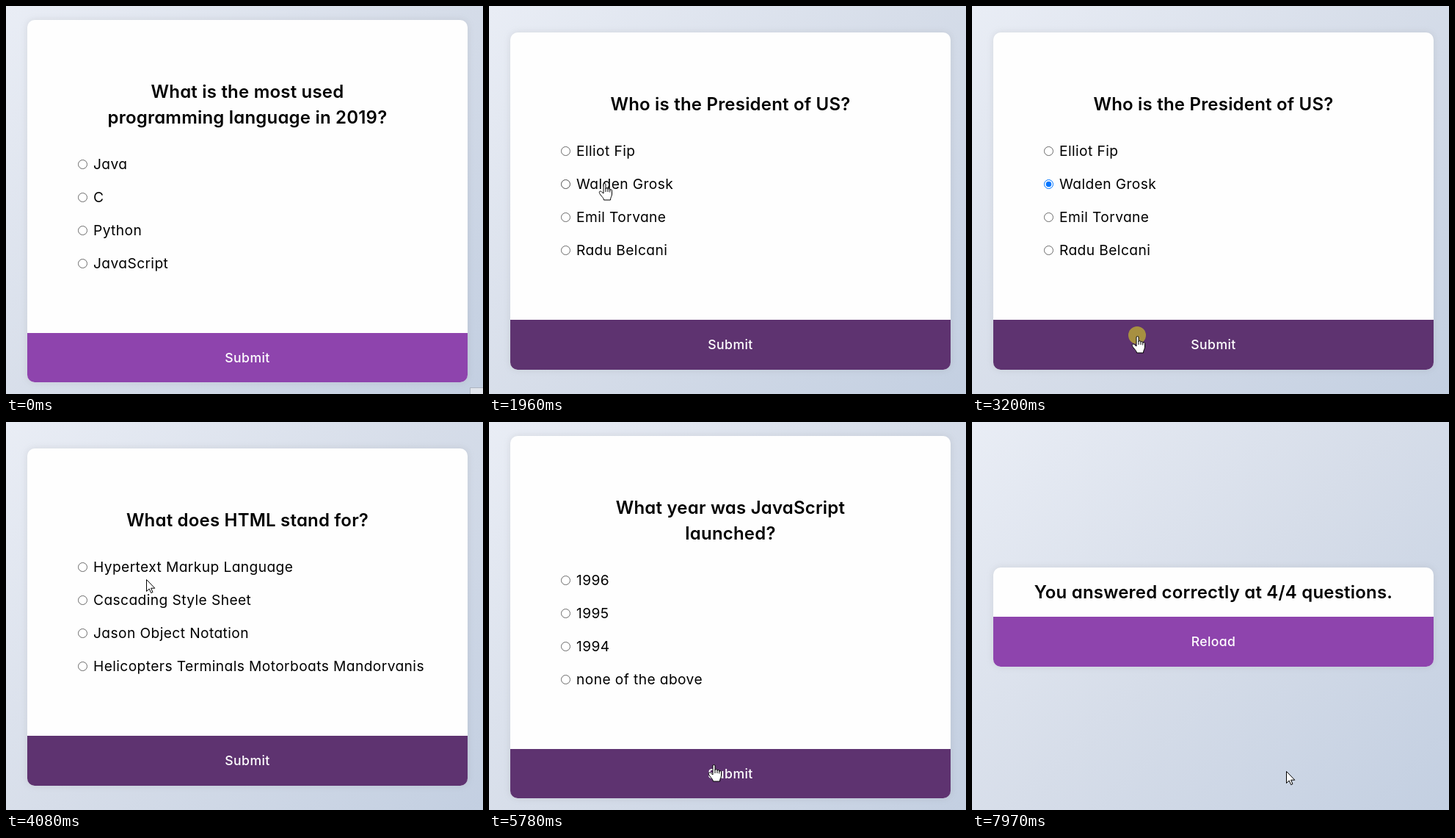
An HTML page for the animation above (8 s loop, 650 by 528 pixels).

```html
<!DOCTYPE html>
<html lang="en">
<head>
<meta charset="utf-8">
<title>Quiz</title>
<style>
  html, body { margin: 0; width: 100%; height: 100%; overflow: hidden; }
  body { background: linear-gradient(135deg, #e9edf5, #d6dde9 50%, #c3cfe1); }
  svg { display: block; width: 650px; height: 528px; }
  text {
    font: 400 19.2px Inter, "Open Sans", sans-serif;
    font-optical-sizing: none;
    font-feature-settings: "cv11";
    letter-spacing: .4px;
  }
  .title, .action { text-anchor: middle; }
  .title { font-size: 24px; font-weight: 600; letter-spacing: .2px; }
  .action { font-size: 17.6px; font-weight: 500; fill: #fff; }
  .card { fill: #fefefe; filter: drop-shadow(0 0 5px rgba(100, 100, 100, .15)); }
  .button { fill: #8e44ad; }
  .dark .button { fill: #5e3370; }
  .ring { fill: #fff; stroke: #6a6a6a; }
  .hover .ring { stroke: #4f4f4f; }
  .dot { fill: #0075ff; visibility: hidden; }
  .checked .ring { stroke: #0075ff; }
  .checked .dot { visibility: inherit; }
  .pulse { fill: rgba(217, 206, 33, .6); }
  .pointer { fill: #fff; stroke: #000; stroke-linejoin: round; }
</style>
</head>
<body>
<svg id="stage" viewBox="0 0 650 528"></svg>
<script>
const LOOP = 8000;
const ENTER = 70;       // pointer comes into view
const PULSE = 130;      // click highlight
const RESPONSE = 65;    // delay from click to effect
const REST = 250;       // pause after a click before moving on
const LEFT = 29, WIDTH = 600, MIDDLE = 265.5;
const LINE = 35, ROW = 45, BUTTON = 67.5;

// Each question: the pointer picks an option, then sends the answer
const scenes = [
  { title: ['What is the most used', 'programming language in 2019?'],
    options: ['Java', 'C', 'Python', 'JavaScript'], answer: 3,
    pick: { x: 185, y: 357, arrive: 420, click: 490 },
    send: { x: 216, y: 449, arrive: 900, click: 1170 } },
  { title: ['Who is the President of US?'],
    options: ['Elliot Fip', 'Walden Grosk', 'Emil Torvane', 'Radu Belcani'], answer: 1,
    pick: { x: 157, y: 241, arrive: 1960, click: 2160 },
    send: { x: 225, y: 449, arrive: 2720, click: 3200 } },
  { title: ['What does HTML stand for?'],
    options: ['Hypertext Markup Language', 'Cascading Style Sheet', 'Jason Object Notation',
      'Helicopters Terminals Motorboats Mandorvanis'], answer: 0,
    pick: { x: 190, y: 204, arrive: 4220, click: 4420 },
    send: { x: 306, y: 466, arrive: 5050, click: 5650 } },
  { title: ['What year was JavaScript', 'launched?'],
    options: ['1996', '1995', '1994', 'none of the above'], answer: 1,
    pick: { x: 140, y: 266, arrive: 6410, click: 6680 },
    send: { x: 424, y: 471, arrive: 7530, click: 7600 } },
  { title: ['You answered correctly at 4/4 questions.'], options: [], action: 'Reload' }
];

const clicks = scenes.flatMap(({ pick, send }) => pick ? [pick, send] : []);
const stops = [
  { x: 655, y: 430, arrive: 0, click: ENTER - REST },
  ...clicks,
  { x: 428, y: 475, arrive: 7940, click: LOOP }
];

const stage = document.getElementById('stage');

function add(parent, tag, attrs = {}, text = '') {
  const node = document.createElementNS('http://www.w3.org/2000/svg', tag);
  for (const key in attrs) node.setAttribute(key, attrs[key]);
  node.textContent = text;
  return parent.appendChild(node);
}

function show(node, visible) {
  node.style.visibility = visible ? 'visible' : 'hidden';
}

function buildScene(scene, index) {
  const { title, options, action = 'Submit' } = scene;
  const padding = options.length ? 64 : 0;
  const body = 32 + LINE * title.length + 2 * padding + (options.length ? 196 : 0);
  const top = Math.round(MIDDLE - (body + BUTTON) / 2);
  const bottom = Math.round(MIDDLE + (body + BUTTON) / 2);
  const button = Math.round(MIDDLE + (body - BUTTON) / 2);

  const node = add(stage, 'g');
  add(node, 'rect', { class: 'card', x: LEFT, y: top, width: WIDTH, height: bottom - top, rx: 10 });
  add(node, 'path', { class: 'button',
    d: `M${LEFT} ${button}h${WIDTH}V${bottom - 10}a10 10 0 0 1 -10 10H${LEFT + 10}a10 10 0 0 1 -10 -10Z` });
  add(node, 'text', { class: 'action', x: LEFT + WIDTH / 2, y: button + 40 }, action);
  title.forEach((line, i) => add(node, 'text',
    { class: 'title', x: LEFT + WIDTH / 2, y: top + padding + 42 + LINE * i }, line));

  const rows = options.map((label, i) => {
    const y = top + 126.5 + LINE * title.length + ROW * i;
    const row = add(node, 'g');
    add(row, 'circle', { class: 'ring', cx: 104.5, cy: y, r: 6 });
    add(row, 'circle', { class: 'dot', cx: 104.5, cy: y, r: 3.8 });
    const text = add(row, 'text', { x: 119, y: y + 6.5 }, label);
    return { node: row, y, right: 119 + text.getComputedTextLength() };
  });

  const start = index ? scenes[index - 1].send.click + RESPONSE : 0;
  Object.assign(scene, { node, rows, start, button, bottom });
}

scenes.forEach(buildScene);
const corner = add(stage, 'rect',
  { x: 632.5, y: 519.5, width: 20, height: 12, fill: '#e1e5ec', stroke: '#aeb5c1' });
const pulse = add(stage, 'circle', { class: 'pulse', cy: -1, r: 12 });
const arrow = add(stage, 'path',
  { class: 'pointer', d: 'M.5 .5V16.5L4.2 13 6.7 18.6 9 17.6 6.6 12.2H11.8Z' });
const hand = add(stage, 'path', { class: 'pointer',
  d: 'M-1 12V2a1.5 1.5 0 0 1 3 0V8a1.5 1.5 0 0 1 3 .2v.6a1.4 1.4 0 0 1 2.8 .3v.8' +
     'a1.3 1.3 0 0 1 2.7 .3V15c0 3-2 4-2 8H-.5c0-3-5-6.5-6-9.5s2-3 3-1.5L-1 14Z' +
     'M2 8v4M5 9v3M7.8 10v2.5' });

function pointerAt(t) {
  const next = stops.findIndex((stop, i) => i && t < stop.click + REST);
  const from = stops[next - 1], to = stops[next];
  const leave = from.click + REST;
  const progress = Math.min(1, (t - leave) / (to.arrive - leave));
  const k = Math.sin(Math.max(0, progress) * Math.PI / 2);
  return [from.x + (to.x - from.x) * k, from.y + (to.y - from.y) * k];
}

function render() {
  const t = performance.now() % LOOP;
  const scene = scenes.filter(s => s.start <= t).pop();
  const [x, y] = pointerAt(t);
  const inView = t >= ENTER;
  const picked = scene.pick && t >= scene.pick.click + RESPONSE;
  const overButton = x > LEFT && x < LEFT + WIDTH && y > scene.button && y < scene.bottom;
  // The button stays dark after sending until the next option is picked
  const pressed = scene.start > 0 && scene.pick && !picked;
  let overRow = false;

  scenes.forEach(s => show(s.node, s === scene));
  scene.node.classList.toggle('dark', Boolean(overButton || pressed));
  scene.rows.forEach((row, i) => {
    const over = inView && x > 98 && x < row.right && Math.abs(y - row.y) < 16;
    overRow ||= over;
    row.node.classList.toggle('hover', over);
    row.node.classList.toggle('checked', picked && i === scene.answer);
  });

  show(corner, !inView);
  show(pulse, clicks.some(({ click }) => t >= click && t < click + PULSE));
  show(hand, inView && (overButton || overRow));
  show(arrow, inView && !overButton && !overRow);
  const shift = `translate(${Math.round(x)} ${Math.round(y)})`;
  [pulse, hand, arrow].forEach(node => node.setAttribute('transform', shift));
  requestAnimationFrame(render);
}

render();
</script>
</body>
</html>
```
